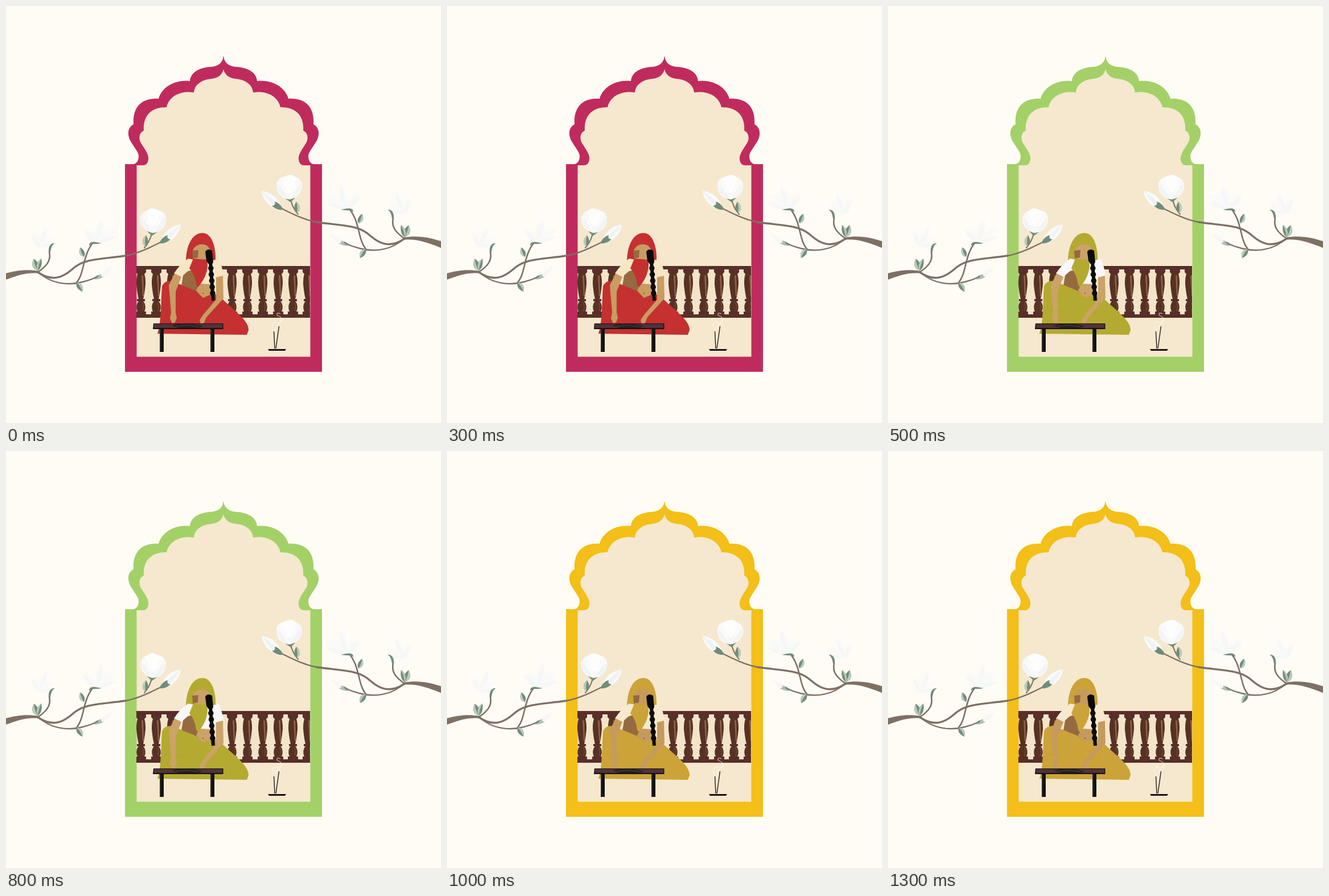
Write an HTML page without scripts that moves like this. It is 764 by 733 pixels and loops after 1.5 s.

```html
<!DOCTYPE html>
<html lang="en">
<head>
<meta charset="utf-8">
<title>Woman in an arched window</title>
<style>
html, body { margin: 0; width: 100%; height: 100%; overflow: hidden; background: #fffcf5; }
svg { display: block; width: 764px; height: 733px; }
.frame, .sari, .blouse, .fold, .wood, .skin { animation: 1.5s step-end infinite; }
.frame { animation-name: frame; }
.sari { animation-name: sari; }
.blouse { animation-name: blouse; }
.fold { animation-name: fold; }
.wood { animation-name: wood; }
.skin { animation-name: skin; }
@keyframes frame { 0% { fill: #c02b5e } 33.333% { fill: #a3d168 } 66.667%, 100% { fill: #f3bf18 } }
@keyframes sari { 0% { fill: #c43130 } 33.333% { fill: #b4aa31 } 66.667%, 100% { fill: #cba338 } }
@keyframes blouse { 0% { fill: #f6e6c4 } 33.333% { fill: #f8f7f9 } 66.667%, 100% { fill: #f7e9d0 } }
@keyframes fold { 0% { stroke: #bb2d2d } 33.333% { stroke: #aca32e } 66.667%, 100% { stroke: #c39c34 } }
@keyframes wood { 0% { fill: #573224 } 33.333% { fill: #582e26 } 66.667%, 100% { fill: #5a2f28 } }
@keyframes skin { 0% { fill: #c99c62 } 33.333% { fill: #cba268 } 66.667%, 100% { fill: #c59b5d } }
.stem { fill: none; stroke: #7e7064; stroke-linecap: round; }
.leaf { fill: #718c79; }
.pale { fill: #b9cbb9; }
</style>
</head>
<body>
<svg viewBox="0 0 764 733">
<defs>
  <path id="outer" d="M382 89C380 100 373 106 360 107C339 108 324 117 323 132C299 129 274 141 268 163C238 161 222 178 224 208C214 213 212 226 219 238C226 250 233 257 233 264C233 272 229 277 224 278H209V643H382.5V89Z"/>
  <path id="inner" d="M382 112C379 122 371 127 360 128C342 130 331 139 330 152C306 148 286 159 282 178C257 177 240 192 242 219C233 223 232 235 239 244C246 255 251 262 250 270C249 277 245 280 241 280H229.500V616.500H382.5V112Z"/>
  <pattern id="hatch" width="5" height="5" patternUnits="userSpaceOnUse" patternTransform="rotate(28)">
    <path d="M0 2H5" stroke="#ead3b4" stroke-width=".8"/>
  </pattern>
  <g id="baluster">
    <path class="wood" d="M-9 461H9V468L6 471C8 477 8 483 8 489C7 499 6 507 4 515H7V519H4C8 523 9 531 6 537H9V545H-9V537H-6C-9 531-8 523-4 519H-7V515H-4C-6 507-7 499-8 489C-8 483-8 477-6 471L-9 468Z"/>
    <path d="M1 473L4 474L5 510H3Z" fill="#936047"/>
    <path d="M3 521Q6 529 3 536" fill="none" stroke="#80503b"/>
    <path d="M-9 463H9V468H-9ZM-7 515H7V519H-7ZM-9 538H9V545H-9Z" fill="#5b2c31"/>
  </g>
  <g id="leaf">
    <path class="leaf" d="M0 0C-8-6-6-14 1-20C6-12 6-5 0 0"/>
    <path class="pale" d="M0 0C-8-6-6-14 1-20Q-2-9 0 0"/>
  </g>
  <g id="bud">
    <path d="M-14 12C-12-2 3-15 20-17C19-3 6 13-11 16Z" fill="#f9fafa"/>
    <path d="M-12 14C-5 1 7-9 20-17C10 0 0 10-11 16Z" fill="#f0f3f5"/>
    <path class="leaf" d="M-18 16C-14 8-9 3-3 2C-5 8-1 9 2 9C-4 15-11 17-18 16"/>
  </g>
  <g id="faint">
    <path d="M-27-7C-20-13-9-9-2 0C-5-14 0-24 9-27C13-19 12-9 8-2C16-11 25-13 33-11C30 2 17 15-4 16C-16 12-19 3-27-7Z" fill="#fafaf8"/>
    <path d="M-25-6C-11-4-4 6-4 16Q-17 11-25-6M9-26Q-3-6-4 16Q13-1 9-26M33 4Q10 4-4 16Q20 16 33 4" fill="#f6f7f7"/>
  </g>
  <g id="branch">
    <use href="#faint" transform="translate(160 401)"/>
    <use href="#faint" transform="translate(61 410) rotate(12) scale(.72 .9)"/>
    <use href="#bud" transform="translate(170 470) scale(.85 .65)" opacity=".55"/>
    <path d="M-10 473C8 467 30 461 59 466L57 470C35 468 18 474-10 485Z" fill="#7e7064"/>
    <path class="stem" stroke-width="3.400" d="M56 468C82 486 101 476 116 463C136 444 160 446 210 439"/>
    <path class="stem" stroke-width="2.400" d="M210 439C232 435 252 425 274 414M57 468C78 488 109 492 135 485Q148 482 160 476"/>
    <path class="stem" stroke-width="2.600" d="M124 486C138 470 134 440 152 417M57 467C70 458 80 448 76 432"/>
    <path class="stem" stroke-width="2" d="M243 425Q253 414 256 399"/>
    <path class="leaf" d="M75 433C74 423 78 416 86 417C80 420 79 427 78 433ZM146 421C146 416 150 414 157 415L168 417Q158 419 151 418ZM153 480Q157 474 163 473Q161 479 153 480ZM248 396Q258 394 266 397L256 404Z"/>
    <use href="#leaf" transform="translate(56 465) rotate(-22) scale(1.100)"/>
    <use href="#leaf" transform="translate(56 465) rotate(14) scale(.8 1.100)"/>
    <use href="#leaf" transform="translate(137 441) rotate(-24) scale(.9)"/>
    <use href="#leaf" transform="translate(124 486) rotate(145) scale(.95)"/>
    <use href="#leaf" transform="translate(245 423)"/>
    <use href="#bud" transform="translate(287 401)"/>
    <path d="M236 371C240 362 246 358 253 360L258 355L265 360C273 358 279 364 281 371C282 386 275 397 258 399C244 397 234 385 236 371Z" fill="#f8f9f8"/>
    <path d="M246 361Q253 355 258 356Q268 357 274 364L270 384Q258 392 246 382Z" fill="#fdfdfc"/>
    <path d="M236 372Q246 375 254 397Q239 391 236 372M281 373Q270 377 261 398Q279 392 281 373" fill="#f2f4f5"/>
    <path d="M247 366Q249 383 258 390Q269 382 271 366" fill="none" stroke="#f1f3f3"/>
  </g>
  <g id="leg">
    <path d="M270 567H277V608H270Z" fill="#111"/>
    <path d="M271 568V607" stroke="#4d4543"/>
  </g>
</defs>

<rect width="764" height="733" fill="#fffcf5"/>
<g class="frame">
  <use href="#outer"/>
  <use href="#outer" transform="matrix(-1 0 0 1 764 0)"/>
</g>
<g fill="#f5e8ce">
  <use href="#inner"/>
  <use href="#inner" transform="matrix(-1 0 0 1 764 0)"/>
</g>

<svg x="229" y="450" width="305" height="105" viewBox="229 450 305 105">
  <path d="M229 463H534V543H229Z" fill="url(#hatch)"/>
  <use href="#baluster" x="237"/>
  <use href="#baluster" x="264"/>
  <use href="#baluster" x="291"/>
  <use href="#baluster" x="397"/>
  <use href="#baluster" x="424"/>
  <use href="#baluster" x="451"/>
  <use href="#baluster" x="478"/>
  <use href="#baluster" x="504"/>
  <use href="#baluster" x="530"/>
  <path class="wood" d="M229 457H534V463H229ZM229 542H534V548H229Z"/>
</svg>

<g id="woman">
  <path class="sari" d="M316 447C317 417 329 399 345 399C361 399 369 422 368 449L340 456Z"/>
  <path class="skin" d="M328 430C333 416 353 415 358 428V449L344 455L328 443Z"/>
  <path d="M327 430L338 429L337 442L328 444Z" fill="#96683f"/>
  <path d="M312 468L336 462L346 494L338 510L308 492Z" fill="#966a41"/>
  <path class="blouse" d="M344 450L374 445Q380 458 382 474L369 477L362 491L340 491Z"/>
  <path class="skin" d="M340 488L361 489L365 512L346 516L334 500Z"/>
  <path class="blouse" d="M320 444L336 447L324 462L307 477L295 470Q306 453 320 444Z"/>
  <path class="sari" d="M329 444L353 446C357 462 349 482 337 494L334 490Q332 472 322 461Z"/>
  <path class="sari" d="M274 493C278 482 291 481 300 487L334 501L346 513L365 505L379 514C401 536 427 553 426 570L423 578L266 576C273 555 272 520 274 493Z"/>
  <path class="fold" d="M281 533Q296 532 306 537M344 543Q357 541 370 536" fill="none"/>
  <path class="skin" d="M296 470L308 476L298 502L298 539L300 548L297 556L292 558L288 549L290 539L286 491Z"/>
  <path class="skin" d="M369 477L381 474L382 514L352 547L348 557L342 559L340 552L346 543L369 516Z"/>
  <circle cx="346" cy="505" r="1" fill="#6c482d"/>
  <path d="M350 432Q354 425 362 430L364 450Q356 456 352 448Z" fill="#0b0b0b"/>
  <path d="M359 450L363 506" stroke="#0b0b0b" stroke-width="9.500" stroke-linecap="round" stroke-dasharray="0 11"/>
  <path d="M359 449L364 518" stroke="#0b0b0b" stroke-width="6"/>
</g>

<g id="table">
  <use href="#leg"/>
  <use href="#leg" x="89"/>
  <path d="M259 558H381.500V568H258Z" fill="#161112"/>
  <path d="M260 559H380V566H260Z" fill="#50323a"/>
  <path d="M291 562L306 558L328 559L346 563L337 566H304Z" fill="#262020"/>
  <path d="M298 563L320 561L338 564" fill="none" stroke="#504647"/>
</g>

<g id="incense" fill="none">
  <path d="M474 570C463 564 468 554 476 556C484 558 487 547 479 545C473 543 476 538 482 541M475 568C471 560 482 562 486 550" stroke="#fffaf1" stroke-width="1.200" opacity=".65"/>
  <path d="M472 602L470.500 572M474 602L479.500 563" stroke="#302622" stroke-width="1.500"/>
  <path d="M460 603H492L490 606H462Z" fill="#1a0f14"/>
</g>

<use href="#branch"/>
<use href="#branch" transform="matrix(-1 0 0 1 756 -59)"/>
</svg>
</body>
</html>
```
